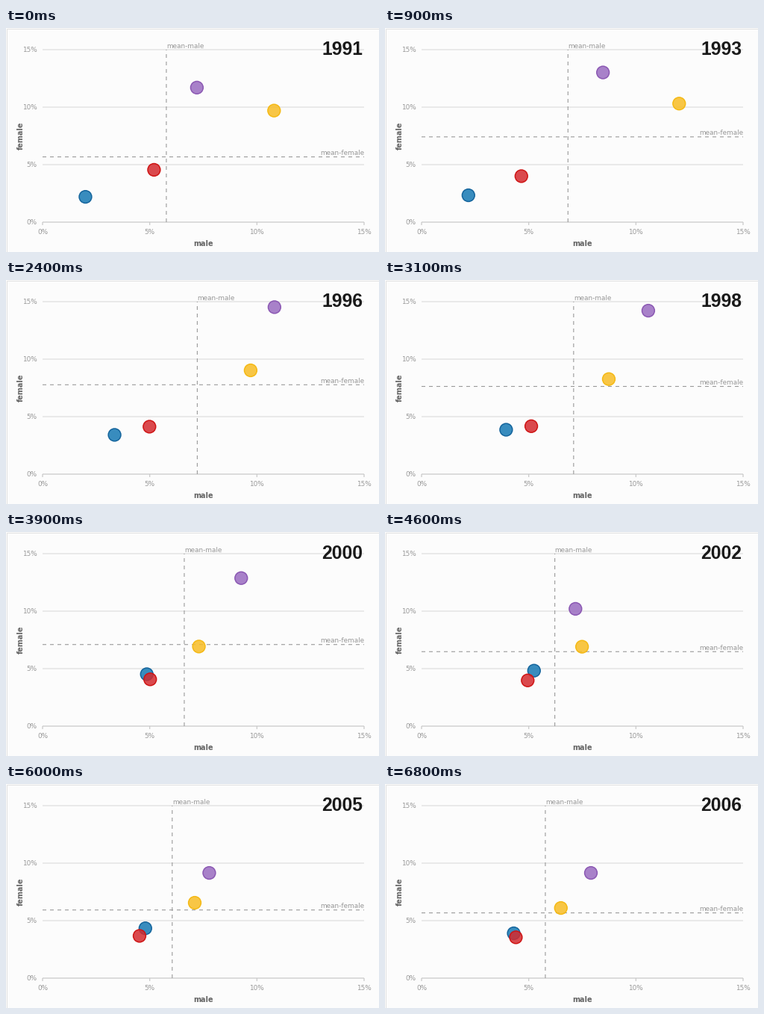
These frames come from a looping animation (500 px wide and 300 px high, 8 s). A matplotlib script:

```python
import math

import numpy as np
import matplotlib.pyplot as plt
from matplotlib.animation import FuncAnimation
from matplotlib.patches import Circle, Rectangle

W, H, DPI = 500, 300, 100
LEFT, RIGHT, TOP, BASE = 49, 480, 29, 260
STEP, LOOP = 100, 8000
START, YEAR_MS = 400, 407
FIRST_YEAR, LAST = 1991, 15
PT = 72 / DPI

# turning points of the paths, in years after the first
KEYS = [0, 1, 3, 6, 9, 10, 12, LAST]

# (rim, fill, male %, female %) at the turning points
SERIES = [
    ("#14649c", "#1578b3",
     [2.0, 2.1, 2.85, 3.65, 5.05, 5.2, 5.5, 4.3],
     [2.2, 2.25, 3.0, 3.65, 4.65, 4.8, 4.95, 3.9]),
    ("#cf1414", "#d42a2e",
     [5.2, 4.65, 4.7, 5.15, 5.0, 5.0, 4.7, 4.4],
     [4.55, 4.0, 4.0, 4.2, 4.05, 4.0, 3.85, 3.55]),
    ("#f5b914", "#f8bd25",
     [10.8, 12.2, 10.6, 9.2, 7.0, 7.4, 7.95, 6.5],
     [9.7, 10.4, 9.6, 8.7, 6.65, 6.85, 7.2, 6.1]),
    ("#8b58b3", "#9a6bc0",
     [7.2, 8.2, 10.5, 11.0, 9.0, 7.1, 7.6, 7.9],
     [11.7, 12.85, 14.3, 14.65, 12.6, 10.4, 9.15, 9.15]),
]


def px(v):
    return LEFT + v / 15 * (RIGHT - LEFT)


def py(v):
    return BASE - v / 15 * (BASE - TOP)


fig = plt.figure(figsize=(W / DPI, H / DPI), dpi=DPI, facecolor="#fcfcfc")
ax = fig.add_axes([0, 0, 1, 1])
ax.set_xlim(0, W)
ax.set_ylim(H, 0)
ax.axis("off")


def line(xs, ys, color, width=1.2, z=1, **kw):
    return ax.plot(xs, ys, color=color, lw=width * PT, zorder=z, snap=False,
                   solid_capstyle="butt", dash_capstyle="butt", **kw)[0]


def mean_line():
    return line([], [], "#999999", 1.1, 2, dashes=(5 / 1.1, 5 / 1.1))


def label(x, y, s, size=8.9, color="#999999", ha="left", family="DejaVu Sans", **kw):
    return ax.text(x, y, s, fontsize=size * PT, color=color, ha=ha,
                   va="baseline", family=family, zorder=2, **kw)


def title(x, y, s, **kw):
    label(x, y, s, 9.8, "#666666", "center", weight="bold", **kw)


ax.add_patch(Rectangle((0.5, 0.5), W - 1, H - 1, fill=False,
                       ec="#e2e2e2", lw=1 * PT))
for v in (0, 5, 10, 15):
    line([LEFT, RIGHT], [py(v)] * 2, "#dedede" if v else "#c8c8c8")
    line([px(v)] * 2, [BASE, BASE + 4], "#c8c8c8")
    label(41.8, py(v) + 2.7, f"{v}%", ha="right")
    label(px(v), 276, f"{v}%", ha="center")
title(264.7, 292.5, "male")
title(23, 144.5, "female", rotation=90, rotation_mode="anchor")

mean_x, mean_y = mean_line(), mean_line()
tag_x = label(0, 27, "mean-male")
tag_y = label(RIGHT, 0, "mean-female", ha="right")
year = label(478.3, 35.7, "", 24.7, "#1a1a1a", "right", "Liberation Sans",
             weight="bold")

dots = []
for i, (rim, fill, _, _) in enumerate(SERIES):
    pair = (Circle((0, 0), 8.4, fc=fill, ec="none", alpha=0.85, zorder=4 + i),
            Circle((0, 0), 8.4, fill=False, ec=rim, lw=1.5 * PT, zorder=4 + i))
    for part in pair:
        ax.add_patch(part)
    dots.append(pair)


def pose(p):
    """Pixel centres of all dots at p years after the first."""
    return np.array([(px(np.interp(p, KEYS, male)), py(np.interp(p, KEYS, female)))
                     for _, _, male, female in SERIES])


def draw(n):
    p = min(max((n * STEP - START) / YEAR_MS, 0), LAST)
    points = pose(p)
    for pair, centre in zip(dots, points):
        for part in pair:
            part.center = centre
    # the mean lines keep the closing position until the dots start to move
    mx, my = (points if p > 0 else pose(LAST)).mean(axis=0)
    mean_x.set_data([mx, mx], [BASE, TOP])
    mean_y.set_data([LEFT, RIGHT], [my, my])
    tag_x.set_x(mx)
    tag_y.set_y(my - 2.5)
    year.set_text(str(FIRST_YEAR + math.ceil(p)))
    return []


anim = FuncAnimation(fig, draw, frames=LOOP // STEP, interval=STEP,
                     init_func=lambda: draw(0), repeat=True, repeat_delay=0)
plt.show()
```
